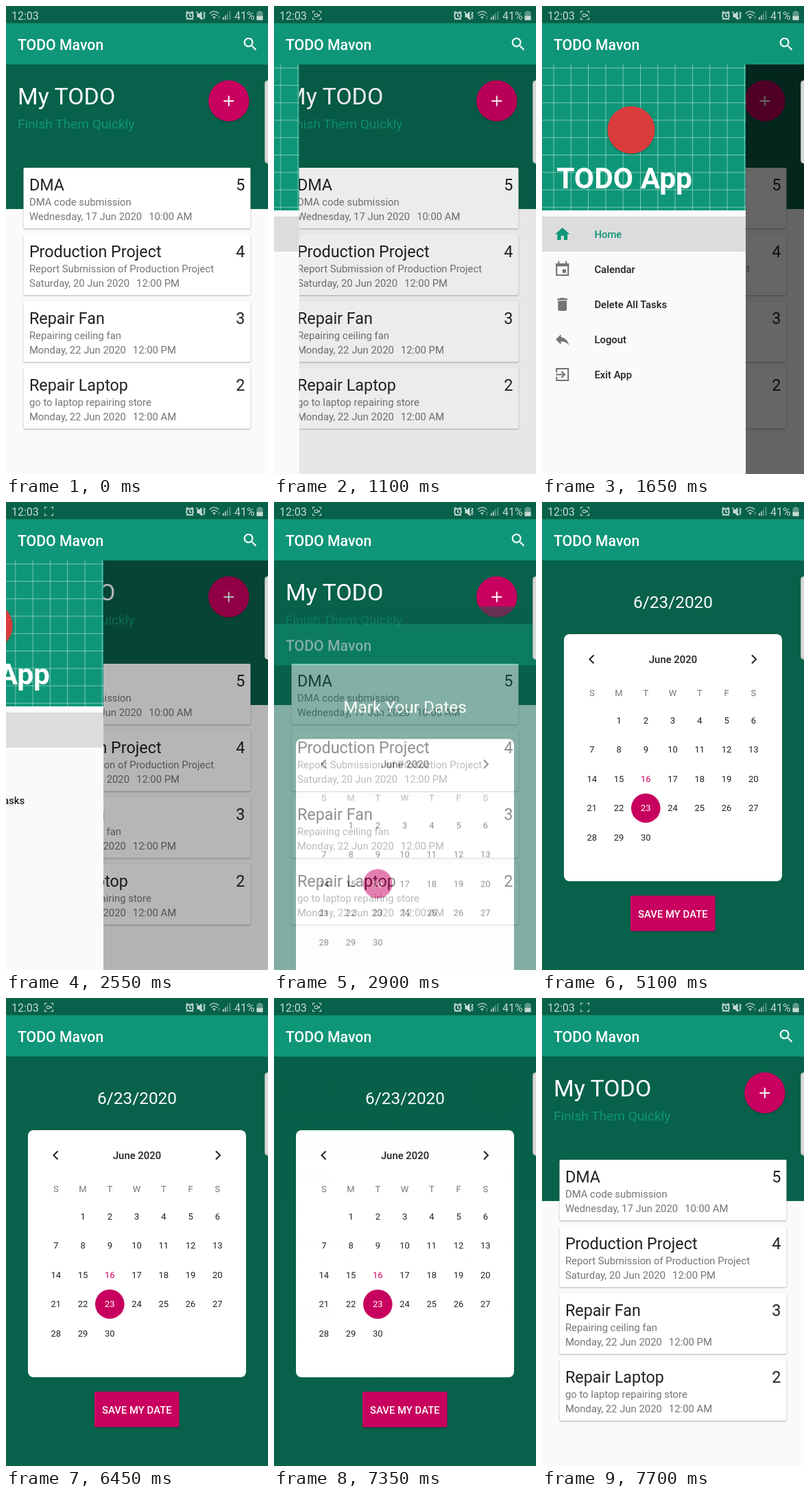
An HTML page for the animation above (7750 ms loop, 382 by 680 pixels).

```html
<!DOCTYPE html>
<html lang="en">
<head>
<meta charset="utf-8">
<title>Todo app</title>
<style>
  html, body { margin: 0; width: 100%; height: 100%; overflow: hidden; background: #fafafa; }
  svg { display: block; width: 100%; height: 100%; font-family: Roboto, "Noto Sans", sans-serif; }
  text { white-space: pre; }
  :root { --dark: #08614a; --green: #0f9678; --pink: #c8005f; }
  .dark { fill: var(--dark); }
  .green { fill: var(--green); }
  .pink { fill: var(--pink); }
  .white { fill: #fff; }
  .grey { fill: #757575; }
  .ink { fill: #212121; }
  .mid { text-anchor: middle; }
  .end { text-anchor: end; }
  .bar { font-size: 21.22px; font-weight: 500; }
  .head { font-size: 23.34px; }
  .body { font-size: 14.86px; }
  .strong { font-size: 14.86px; font-weight: 500; }
  .day { font-size: 13px; }
  .raised { filter: drop-shadow(0 1px 1px rgba(0, 0, 0, .3)); }
  .line { fill: none; stroke: currentColor; stroke-width: 2; }

  .drawer, .scrim, .calendar, .slide, .pre, .post, .rec, .lens {
    animation: 7.75s linear infinite;
  }
  .drawer { animation-name: drawer; }
  .scrim { animation-name: scrim; }
  .calendar { animation-name: fade; }
  .slide { animation-name: slide; }
  .pre { animation-name: pre; animation-timing-function: step-end; }
  .post { animation-name: post; animation-timing-function: step-end; }
  .rec { animation-name: rec; animation-timing-function: step-end; }
  .lens { animation-name: lens; animation-timing-function: step-end; }

  @keyframes drawer {
    0%, 13.55% { transform: translateX(-297px); }
    14.19% { transform: translateX(-261px); animation-timing-function: cubic-bezier(.3, .3, .4, 1); }
    21.2%, 31.5% { transform: none; animation-timing-function: cubic-bezier(.3, .2, .4, 1); }
    35.48%, 100% { transform: translateX(-297px); }
  }
  @keyframes scrim {
    0%, 13.55% { opacity: 0; }
    14.19% { opacity: .073; animation-timing-function: cubic-bezier(.3, .3, .4, 1); }
    21.2%, 31.5% { opacity: .6; animation-timing-function: cubic-bezier(.3, .2, .4, 1); }
    35.48%, 100% { opacity: 0; }
  }
  @keyframes fade {
    0%, 36.13% { opacity: 0; }
    38.71%, 94.84% { opacity: 1; }
    98.71%, 100% { opacity: 0; }
  }
  @keyframes slide {
    0%, 36.13% { transform: translateY(385px); animation-timing-function: cubic-bezier(.215, .61, .355, 1); }
    41.29%, 94.84% { transform: none; animation-timing-function: cubic-bezier(.55, .05, .68, .19); }
    98.71%, 100% { transform: translateY(385px); }
  }
  @keyframes pre { 0% { visibility: visible; } 61.93%, 100% { visibility: hidden; } }
  @keyframes post { 0% { visibility: hidden; } 61.93%, 100% { visibility: visible; } }
  @keyframes rec { 0% { opacity: 0; } .64%, 100% { opacity: 1; } }
  @keyframes lens {
    0%, 8.38%, 17.4%, 27.1%, 36.1%, 45.2%, 55.5%, 65.2%, 74.8%, 82.6%, 91.6% { opacity: 1; }
    4.5%, 15.5%, 24.5%, 32.3%, 41.3%, 50.9%, 59.3%, 68.4%, 79.4%, 87.1%, 95.5%, 100% { opacity: 0; }
  }
</style>
</head>
<body>
<svg viewBox="0 0 382 680">
  <!-- Task list -->
  <rect width="382" height="680" fill="#fafafa"/>
  <rect class="dark" width="382" height="295"/>
  <rect class="green" y="25" width="382" height="60"/>
  <text class="bar white" x="17" y="63.5">TODO Mavon</text>
  <path class="white" transform="translate(343.5 42.8) scale(1.061)" d="M15.5 14h-.79l-.28-.27A6.5 6.5 0 1 0 13.73 14.43l.27.28v.79l5 4.99L20.49 19zM9.5 14a4.5 4.5 0 1 1 0-9 4.500 4.500 0 0 1 0 9z"/>
  <text class="white" x="17" y="142.5" font-size="33.96">My TODO</text>
  <text class="green" x="17" y="177.5" font-size="19.1">Finish Them Quickly</text>
  <circle class="pink raised" cx="324.8" cy="137.8" r="29.7"/>
  <path class="line" color="#fff" d="M317.4 138h14.8M324.8 130.6v14.8"/>
  <g id="tasks"></g>

  <!-- Navigation drawer -->
  <rect class="scrim" y="85" width="382" height="595"/>
  <g class="drawer">
    <rect y="85" width="297" height="595" fill="#fafafa"/>
    <rect class="green" y="85" width="297" height="212"/>
    <path id="grid" fill="none" stroke="#fff" stroke-opacity=".45"/>
    <circle class="raised" cx="130" cy="180" r="34.5" fill="#da3c3e"/>
    <text class="white" x="21.2" y="265" font-size="42.44" font-weight="700">TODO App</text>
    <rect y="306" width="297" height="51" fill="#dcdcdc"/>
    <g id="menu"></g>
  </g>

  <!-- Calendar -->
  <g class="calendar"><g class="slide">
    <rect class="dark" width="382" height="680"/>
    <rect class="green" y="25" width="382" height="60"/>
    <text class="bar white" x="17" y="63.5">TODO Mavon</text>
    <g class="white mid" font-size="24.4">
      <text class="pre" x="191" y="153.5">Mark Your Dates</text>
      <text class="post" x="191" y="153.5">6/23/2020</text>
    </g>
    <rect class="white" x="32" y="192" width="318" height="359" rx="8"/>
    <text class="strong ink mid" x="191" y="233.5">June 2020</text>
    <path class="line" color="#212121" d="M75.5 222.5l-6 6 6 6M306 222.5l6 6-6 6"/>
    <g id="days" class="day mid"></g>
    <rect class="pink raised" x="129" y="572" width="123.5" height="51.5" rx="2"/>
    <text class="strong white mid" x="190.8" y="603.8">SAVE MY DATE</text>
  </g></g>

  <!-- System overlay -->
  <rect class="dark" width="382" height="25"/>
  <g fill="#c3dbd3" color="#c3dbd3" font-size="16">
    <text x="8" y="19.5">12:03</text>
    <g class="rec" opacity=".85">
      <path class="line" style="stroke-width:1.1" d="M56.6 10.5v-3h3M65.5 7.5h3v3M68.5 16.5v3h-3M59.6 19.5h-3v-3"/>
      <g class="lens">
        <rect class="line" x="59.3" y="11.5" width="4.4" height="4" rx="1" style="stroke-width:1.1"/>
        <path d="M64.5 13l2.2-1.5v4l-2.2-1.5z"/>
      </g>
    </g>
    <circle class="line" cx="268" cy="14.3" r="4.8"/>
    <path class="line" style="stroke-width:1.7" d="M268 11.2v3.4l2.2 1M262.3 10.3l3-2.7M273.7 10.3l-3-2.7M264.8 18l-1.6 1.8M271.2 18l1.6 1.8"/>
    <path d="M278.5 11.5h2.8l4.2-4v13l-4.200-4h-2.800z"/>
    <path class="line" style="stroke-width:1.500" d="M277.500 8l9.500 11.500M288 8.500l2 2-2 2 2 2-2 2 2 2"/>
    <g opacity=".8">
      <path class="line" style="stroke-width:1.5" d="M296.500 11q7-6.500 14 0M299 14q4.500-4 9 0"/>
      <path d="M301 16q2.500-2 5 0l-2.500 3z"/>
      <path d="M309 16h3l-1.500-2zM309 17.500h3l-1.500 2z" opacity=".7"/>
      <path d="M316 16h2v4h-2zM319 13.500h2v6.500h-2z"/>
      <path d="M322 10.500h2v9.500h-2zM325.500 7.500h2v12.500h-2z" opacity=".5"/>
    </g>
    <text x="333" y="19.5">41%</text>
    <path d="M368 7h4v1.5h2.5v12h-9v-12h2.5z" opacity=".45"/>
    <path d="M365.5 14.5h9v6h-9z"/>
  </g>
  <rect x="377.5" y="108.5" width="14" height="120" rx="4" fill="#d6d8d7" stroke="#a9b3b0"/>
</svg>
<script>
  const $ = id => document.getElementById(id);
  const text = (cls, x, y, s) => `<text class="${cls}" x="${x}" y="${y}">${s}</text>`;

  const tasks = [
    ["DMA", "DMA code submission", "Wednesday, 17 Jun 2020", "10:00 AM"],
    ["Production Project", "Report Submission of Production Project", "Saturday, 20 Jun 2020", "12:00 PM"],
    ["Repair Fan", "Repairing ceiling fan", "Monday, 22 Jun 2020", "12:00 PM"],
    ["Repair Laptop", "go to laptop repairing store", "Monday, 22 Jun 2020", "12:00 AM"]
  ];
  $("tasks").innerHTML = tasks.map(([name, note, date, time], i) => {
    const y = 235 + 97 * i;
    return `<rect class="white raised" x="25.5" y="${y}" width="331" height="88" rx="2"/>` +
      text("head ink", 33.9, y + 33.3, name) +
      text("head ink end", 348.3, y + 33.3, 5 - i) +
      text("body grey", 33.9, y + 55.3, note) +
      text("body grey", 33.9, y + 75.6, `${date}<tspan dx="10">${time}</tspan>`);
  }).join("");

  const cell = 25.3;
  let grid = "";
  for (let x = 17; x < 297; x += cell) grid += `M${x} 85v212`;
  for (let y = 90; y < 297; y += cell) grid += `M0 ${y}h297`;
  $("grid").setAttribute("d", grid);

  // Icons on a 24-unit grid: filled part, then stroked part
  const menu = [
    ["Home", "M10 20v-6h4v6h5v-8h3L12 3 2 12h3v8z", ""],
    ["Calendar", "M12 12h5v5h-5zM3 4h18v4H3zM6 1h2v3H6zM16 1h2v3h-2z", "M4 5h16v15H4z"],
    ["Delete All Tasks", "M6 7h12v12q0 2-2 2H8q-2 0-2-2zM5 4h3.5l1-1h5l1 1H19v2H5z", ""],
    ["Logout", "M10 9V5l-7 7 7 7v-4.1c5 0 8.5 1.6 11 5.1-1-5-4-10-11-11z", ""],
    ["Exit App", "", "M4 9V4h16v16H4v-5M3 12h12M10.8 7.7l4.3 4.3-4.3 4.3"]
  ];
  $("menu").innerHTML = menu.map(([label, solid, line], i) => {
    const y = 331.5 + 51 * i, tone = i ? "grey" : "green";
    return `<g class="${tone}" transform="translate(17 ${y - 12.7}) scale(1.061)">` +
      `<path d="${solid}"/><path class="line" color="#757575" d="${line}"/></g>` +
      text("strong " + (i ? "ink" : "green"), 76.4, y + 5.7, label);
  }).join("");

  const colX = c => 72.8 + 39.25 * c;
  const rowY = r => 317.3 + 42.5 * r;
  let days = [..."SMTWTFS"].map((d, c) => text("grey", colX(c), 281.5, d)).join("");
  for (let d = 1; d <= 30; d++) {
    const x = colX(d % 7), y = rowY(Math.floor(d / 7));
    const label = cls => text(cls, x, y + 4.6, d);
    const picked = when => `<circle class="pink ${when}" cx="${x}" cy="${y}" r="21.3"/>` + label("white " + when);
    if (d === 16) days += picked("pre") + label("pink post");
    else if (d === 23) days += label("ink pre") + picked("post");
    else days += label("ink");
  }
  $("days").innerHTML = days;
</script>
</body>
</html>
```
